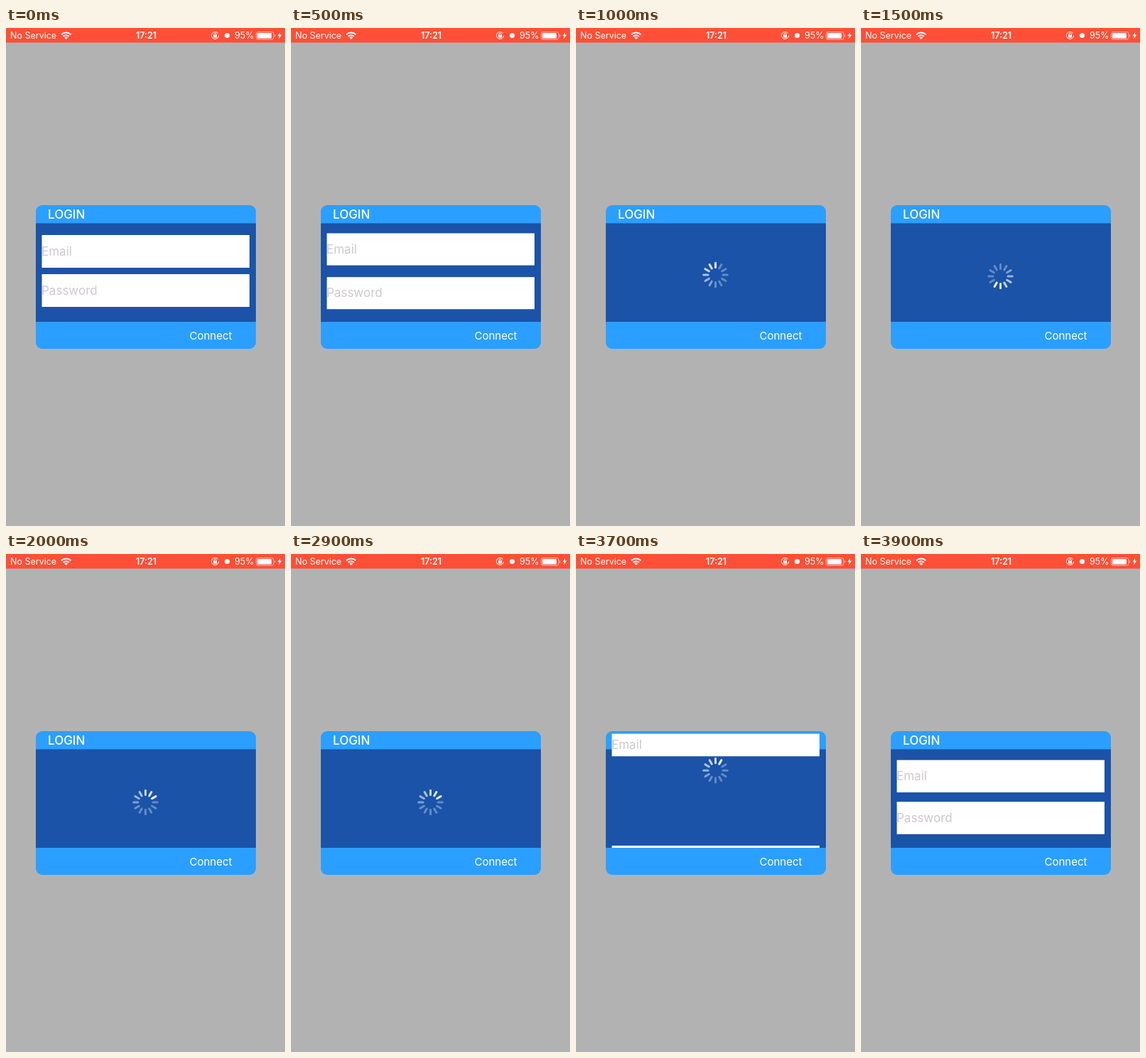
An HTML page for the animation above (4 s loop, 393 px wide and 700 px high).

```html
<!DOCTYPE html>
<html lang="en">
<head>
<meta charset="utf-8">
<title>Login card</title>
<style>
  html, body { margin: 0; width: 100%; height: 100%; overflow: hidden; background: #b2b2b2; }
  svg { display: block; font-family: Inter, sans-serif; fill: #fff; }
  .line { fill: none; stroke: #fff; }
  .placeholder { font-size: 17px; fill: #cdc9cd; }
</style>
</head>
<body>
<svg width="393" height="700" viewBox="0 0 393 700">
  <clipPath id="cardShape"><rect x="42" y="249" width="310" height="202" rx="9"/></clipPath>

  <rect width="393" height="20.5" fill="#ff4f36"/>
  <g font-size="12.5">
    <text x="6" y="15">No Service</text>
    <text x="183" y="15" font-weight="600">17:21</text>
    <text x="322" y="15">95%</text>
  </g>
  <g class="line" stroke-width="2">
    <path d="M78 9.2a9.6 9.6 0 0 1 13.4 0M80.6 11.8a6 6 0 0 1 8.2 0"/>
  </g>
  <path d="M84.7 16l-2.4-2.5a3.5 3.5 0 0 1 4.8 0z"/>
  <path class="line" d="M298.6 7.3a5.1 5.1 0 1 0 1 3.2M293 10V8.6a1.6 1.6 0 0 1 3.2 0V10"/>
  <rect x="292.1" y="9.6" width="5" height="3.8" rx=".5"/>
  <circle cx="311.5" cy="10.5" r="3.5"/>
  <rect class="line" x="352.5" y="5.5" width="24.5" height="10.5" rx="2.5" stroke-opacity=".6"/>
  <rect x="354" y="7" width="20" height="7.5" rx="1"/>
  <path d="M378 9v3.6q1.6-.6 1.6-1.8T378 9z" opacity=".6"/>
  <path d="M386.3 5.8l-3.6 5.4h2.3l-.9 4.2 4.2-5.8h-2.5z"/>

  <g clip-path="url(#cardShape)">
    <rect x="42" y="249" width="310" height="26" fill="#2b9fff"/>
    <text x="59" y="268" font-size="17" font-weight="500">LOGIN</text>
    <rect x="42" y="274.5" width="310" height="139" fill="#1a53a8"/>
    <g id="spinner" class="line" stroke-width="3" stroke-linecap="round"></g>
    <g id="email"><rect x="50.5" width="292.5"/><text class="placeholder" x="50" y="5.5">Email</text></g>
    <g id="password"><rect x="50.5" width="292.5"/><text class="placeholder" x="50" y="5.5">Password</text></g>
    <rect x="42" y="413" width="310" height="38" fill="#2b9fff"/>
    <text x="258.5" y="437.5" font-size="15">Connect</text>
  </g>
</svg>
<script>
const LOOP = 4000, DURATION = 643, OPEN_AT = 436, CLOSE_AT = 3307;
const SPOKES = 12, STEPS_PER_MS = 0.0136;
const get = id => document.getElementById(id);
const spinner = get('spinner'), email = get('email'), password = get('password');

spinner.innerHTML = Array.from({ length: SPOKES }, (_, i) =>
  `<path d="M0-10.5V-16.8" transform="rotate(${i * 360 / SPOKES})"/>`).join('');

// cubic-bezier(.42, 0, .58, 1), solved by bisection
function easeInOut(x) {
  if (x <= 0) return 0;
  if (x >= 1) return 1;
  let low = 0, high = 1;
  for (let i = 0; i < 24; i++) {
    const s = (low + high) / 2, r = 1 - s;
    if (1.26 * s * r * r + 1.74 * s * s * r + s ** 3 < x) low = s; else high = s;
  }
  return low * low * (3 - 2 * low);
}

function placeField(field, centre, hidden) {
  const height = 46 * (1 - hidden), box = field.firstChild;
  field.setAttribute('transform', `translate(0 ${centre})`);
  box.setAttribute('y', -height / 2);
  box.setAttribute('height', height);
}

function draw(t) {
  const hidden = easeInOut((t - OPEN_AT) / DURATION) - easeInOut((t - CLOSE_AT) / DURATION);
  placeField(email, 314 - 146 * hidden, hidden);
  placeField(password, 369 + 182 * hidden, hidden);

  spinner.setAttribute('transform', `translate(196.5 ${349 - 65 * (1 - hidden)})`);
  spinner.setAttribute('opacity', hidden < 0.03 ? 0 : Math.min(1, hidden * 3.2));
  const lead = Math.floor(t * STEPS_PER_MS - 0.85) + SPOKES;
  [...spinner.children].forEach((spoke, i) => {
    const age = (lead - i + SPOKES) % SPOKES;
    spoke.setAttribute('opacity', Math.max(0.32, 0.95 - age * 0.1));
  });
}

function tick() {
  draw(performance.now() % LOOP);
  requestAnimationFrame(tick);
}
tick();
</script>
</body>
</html>
```
